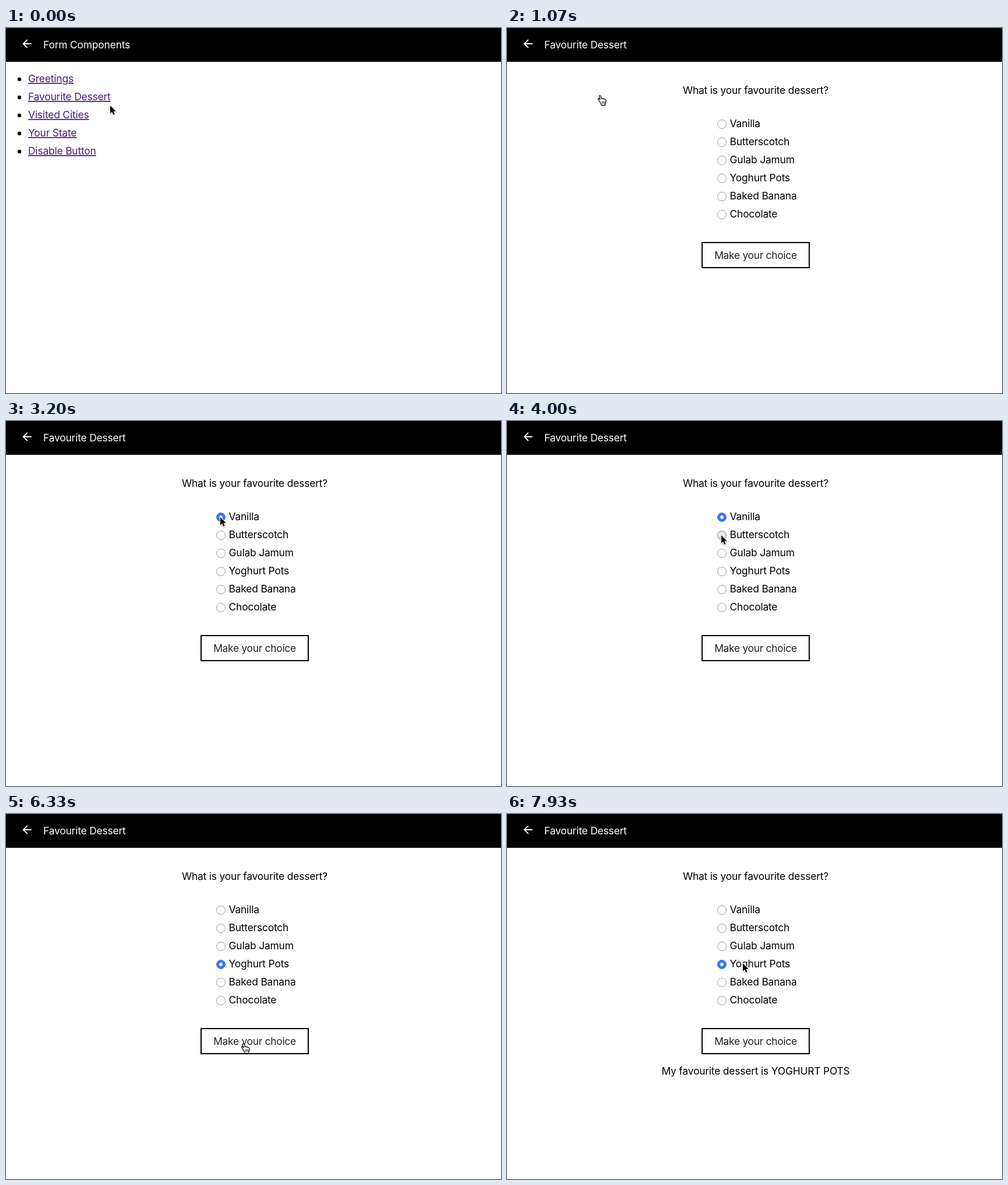
These frames come from a looping animation (850x626 px, 8000 ms). An HTML page:

```html
<!DOCTYPE html>
<html lang="en">
<head>
<meta charset="utf-8">
<title>Form Components</title>
<style>
  html, body { margin: 0; width: 100%; height: 100%; overflow: hidden; background: #fff; }
  svg { display: block; width: 850px; height: 626px; }
  text { font: 17.4px Inter, "Open Sans", sans-serif; letter-spacing: -.18px; white-space: pre; }
  .mid { text-anchor: middle; }
  .caption { fill: #222; letter-spacing: -.28px; }
  .link { fill: #4b1a7e; text-decoration: underline; text-decoration-thickness: 1px; text-underline-offset: 2px; }
  .link.active { fill: #f00; }
  .ring { fill: #fff; stroke: #9c9c9c; }
  .dot { fill: none; }
  .pressed .ring { fill: #e6e6e6; stroke: #8c8c8c; }
  .checked .ring { fill: #3478f6; stroke: #3478f6; }
  .checked .dot { fill: #fff; }
  #cursor { filter: drop-shadow(0 1px 1px rgba(0, 0, 0, .35)); }
  #arrow { stroke: #fff; stroke-width: 2; stroke-linejoin: round; paint-order: stroke; }
  #hand { fill: #fff; stroke: #000; stroke-width: 1.1; stroke-linejoin: round; stroke-linecap: round; }
  .off { display: none; }
</style>
</head>
<body>
<svg viewBox="0 0 850 626">
  <rect width="850" height="58"/>
  <path d="M0 0h3Q0 0 0 3ZM850 0h-3Q850 0 850 3Z" fill="#666"/>
  <path transform="translate(24.6 15.6) scale(.95)" fill="#fff" d="M20 11H7.83l5.59-5.59L12 4l-8 8 8 8 1.41-1.41L7.83 13H20z"/>
  <text id="title" x="64" y="35" fill="#fff"></text>
  <g id="menu"></g>
  <g id="form">
    <text class="mid" x="427" y="113">What is your favourite dessert?</text>
    <g id="options"></g>
    <rect class="hot" x="335" y="368" width="184" height="43" fill="#fff" stroke="#000" stroke-width="2"/>
    <text class="mid caption" x="427" y="396">Make your choice</text>
    <text class="mid" id="result" x="427" y="447">My favourite dessert is YOGHURT POTS</text>
  </g>
  <g id="cursor">
    <path id="arrow" d="M0 0V13.6L3.1 10.7L5.4 15.8L7.6 14.8L5.4 9.8H9.6Z"/>
    <g id="hand">
      <path d="M-.6 10.2L-3 6.8C-4.2 5-2.6 4.3-1.4 5.6L0 7L-1.6 1.6C-2-.4.4-.8 1 1L2.4 5.6C2.6 4.4 4.6 4.4 4.9 6C5.4 5 7.2 5.2 7.4 6.6C8.2 5.9 9.8 6.4 9.9 8C10.2 10.5 10 12 8.6 14L8.4 16.4H2.4C1.8 14 .6 12.4-.6 10.2Z"/>
      <path d="M3.4 10v3.4M5.5 10v3.4M7.6 10v3.4" stroke-width=".9"/>
    </g>
  </g>
</svg>
<script>
const LOOP = 8000, FPS = 15, ROW = 31, PRESS = 130;
const OPEN_LINK = 930, OPEN_FORM = 1000, SHOW_RESULT = 6530;
const links = ['Greetings', 'Favourite Dessert', 'Visited Cities', 'Your State', 'Disable Button'];
const desserts = ['Vanilla', 'Butterscotch', 'Gulab Jamum', 'Yoghurt Pots', 'Baked Banana', 'Chocolate'];

const $ = id => document.getElementById(id);
const show = (id, on) => $(id).classList.toggle('off', !on);
const rows = (labels, markup) => labels.map((label, i) => markup(label, i * ROW)).join('');

$('menu').innerHTML = rows(links, (label, y) => `
  <circle cx="23" cy="${88 + y}" r="3.2"/>
  <text class="link hot" x="38" y="${93 + y}">${label}</text>`);
$('options').innerHTML = rows(desserts, (label, y) => `
  <g class="option">
    <circle class="ring" cx="369" cy="${165 + y}" r="7.5"/>
    <circle class="dot" cx="369" cy="${165 + y}" r="2.9"/>
    <text x="382.5" y="${170 + y}">${label}</text>
  </g>`);
const linkNodes = document.querySelectorAll('.link');
const optionNodes = document.querySelectorAll('.option');
const hotNodes = document.querySelectorAll('.hot');

// Pointer moves: start time, duration, destination.
const radio = i => [368, 165 + i * ROW];
const button = [408, 394];
const moves = [
  [0, 530, [96, 197]],
  [530, 270, [160, 116]],
  [1940, 390, [396, 198]],
  [2330, 140, [358, 166]],
  [2600, 200, radio(0)],
  [3400, 530, radio(1)],
  [4270, 760, radio(3)],
  [5800, 530, button],
  [6670, 260, [560, 425]],
  [6930, 400, radio(3)],
  [7400, 270, button],
  [7670, 260, [405, 256]]
];
const clicks = [{ option: 0, at: 3000 }, { option: 1, at: 4000 }, { option: 3, at: 5270 }];

const ease = k => k * k * (3 - 2 * k);

function pointerAt(t) {
  return moves.reduce((from, [start, duration, to]) => {
    const k = ease(Math.min(1, Math.max(0, (t - start) / duration)));
    return from.map((v, axis) => v + (to[axis] - v) * k);
  }, [179, 133]);
}

// Hidden nodes have an empty box and are never hit.
function isOver(node, x, y) {
  const box = node.getBBox();
  return x > box.x && x < box.x + box.width && y > box.y && y < box.y + box.height;
}

function draw(now) {
  const step = Math.floor((now % LOOP + 4) * FPS / 1000) % (LOOP * FPS / 1000);
  const t = Math.round(step * 100 / FPS) * 10;
  const inForm = t >= OPEN_FORM;
  $('title').textContent = inForm ? 'Favourite Dessert' : 'Form Components';
  show('menu', !inForm);
  show('form', inForm);
  show('result', t >= SHOW_RESULT);
  linkNodes[1].classList.toggle('active', t >= OPEN_LINK);

  const chosen = clicks.filter(c => t >= c.at + PRESS).pop();
  const held = clicks.find(c => t >= c.at && t < c.at + PRESS);
  optionNodes.forEach((node, i) => {
    node.classList.toggle('checked', chosen?.option === i);
    node.classList.toggle('pressed', held?.option === i);
  });

  const [x, y] = pointerAt(t).map(Math.round);
  const pointing = [...hotNodes].some(node => isOver(node, x, y));
  $('cursor').setAttribute('transform', `translate(${x} ${y})`);
  show('hand', pointing);
  show('arrow', !pointing);
  requestAnimationFrame(draw);
}
draw(performance.now());
</script>
</body>
</html>
```
